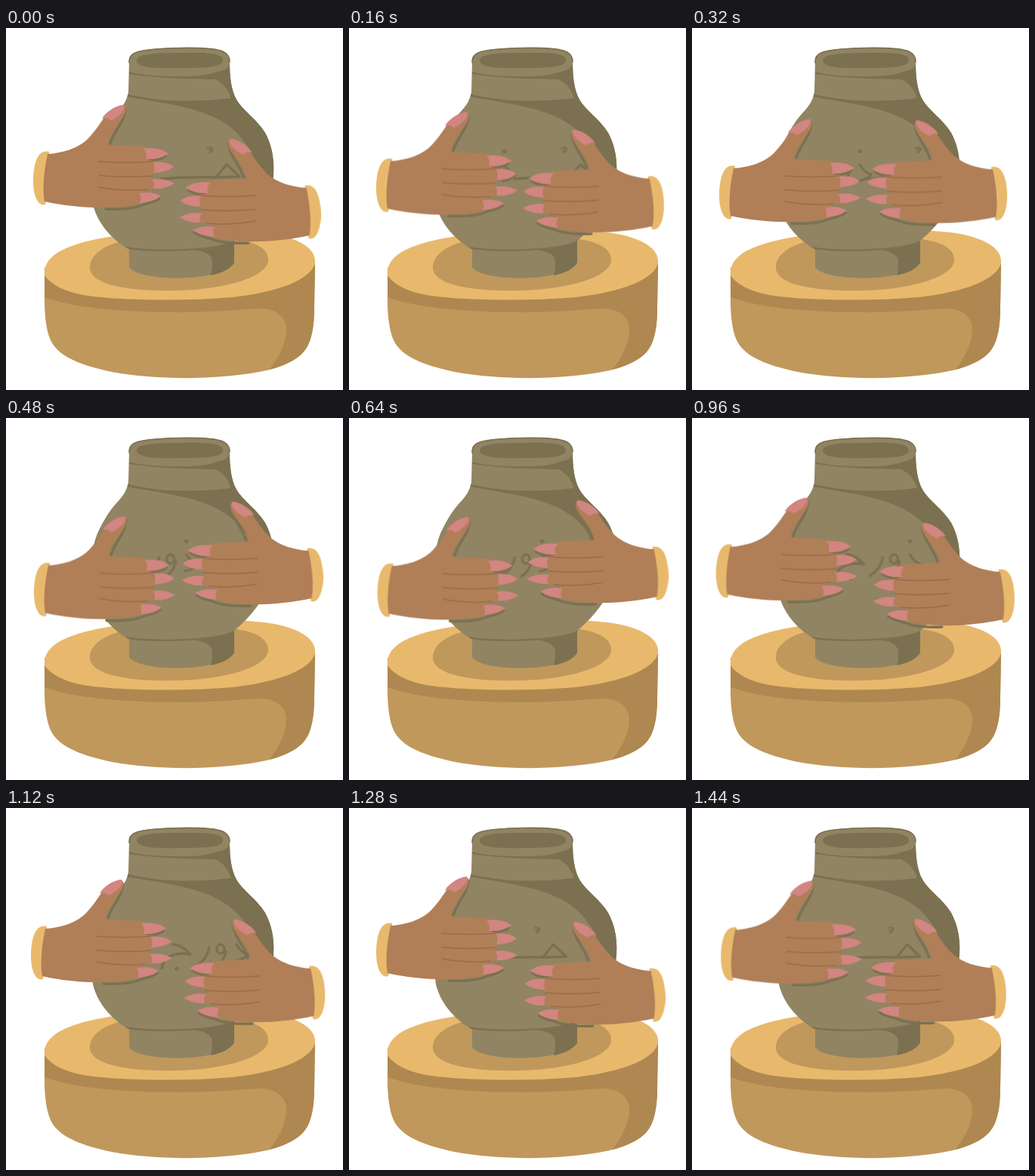
Animation of 446x480 px, one loop 1.52 s. Source, as an HTML page without scripts:

```html
<!DOCTYPE html>
<html lang="en">
<head>
<meta charset="utf-8">
<title>Pottery wheel</title>
<style>
  :root {
    --clay: #918462; --clay-dark: #7b7150;
    --wood: #c0985c; --wood-dark: #ae8850; --wood-light: #e8b96c;
    --skin: #b07f58; --crease: #9b6b4a; --nail: #d28581;
  }
  html, body { margin: 0; height: 100%; overflow: hidden; background: #fff; }
  svg { display: block; width: 100vw; height: 100vh; }
  .clay { fill: var(--clay); }
  .clay-dark { fill: var(--clay-dark); }
  .wood { fill: var(--wood); }
  .wood-dark { fill: var(--wood-dark); }
  .wood-light { fill: var(--wood-light); }
  .skin { fill: var(--skin); }
  .nail { fill: var(--nail); }
  .groove, .crease { fill: none; stroke: var(--clay-dark); stroke-width: 3.4; stroke-linecap: round; stroke-linejoin: round; }
  .crease { stroke: var(--crease); stroke-width: 1.6; }
  .fine { stroke-width: 1.6; }
  .dots { stroke-width: 5.5; }

  /* One loop is 19 ticks of 80 ms */
  .left, .right { animation: left 1.52s steps(2) infinite; }
  .right { animation-name: right; }
  .word { --from: -116.2px; --to: 41.5px; animation: drift 1.52s steps(19) infinite, word 1.52s step-end infinite; }
  .last-letter { animation: last-letter 1.52s step-end infinite; }
  .peak { --from: -64.8px; --to: 72px; animation: drift 1.52s steps(19) -.72s infinite, peak 1.52s step-end infinite; }

  @keyframes drift {
    from { transform: translateX(var(--from)); }
    to { transform: translateX(var(--to)); }
  }
  @keyframes word { 0%, 84.21% { opacity: 0; } 10.52% { opacity: 1; } }
  @keyframes last-letter { 0% { opacity: 0; } 57.89% { opacity: 1; } }
  @keyframes peak { 0%, 84.21% { opacity: 1; } 31.57% { opacity: 0; } }
  @keyframes left {
    0% { transform: translate(0, 0); animation-timing-function: steps(4); }
    21.05% { transform: translate(0, 19px); }
    31.57% { transform: translate(1px, 28.5px); animation-timing-function: steps(1); }
    36.84% { transform: translate(2px, 32px); animation-timing-function: steps(1); }
    42.1% { transform: translate(1.6px, 29.3px); }
    52.63% { transform: translate(-2.5px, 16px); }
    63.15% { transform: translate(-4.3px, 3.8px); }
    73.68% { transform: translate(-3px, -7px); }
    84.21% { transform: translate(0, -11px); }
    94.73% { transform: translate(2.2px, -5.4px); animation-timing-function: steps(1); }
    100% { transform: translate(0, 0); }
  }
  @keyframes right {
    0% { transform: translate(0, 0); animation-timing-function: steps(4); }
    21.05% { transform: translate(.6px, -24.5px); }
    31.57% { transform: translate(3px, -36px); animation-timing-function: steps(1); }
    36.84% { transform: translate(5px, -41px); animation-timing-function: steps(1); }
    42.1% { transform: translate(6px, -38px); }
    52.63% { transform: translate(7px, -23px); }
    63.15% { transform: translate(10.3px, -8px); }
    73.68% { transform: translate(5.7px, .8px); }
    84.21% { transform: translate(2px, 4px); }
    94.73% { transform: translate(-.8px, 0); animation-timing-function: steps(1); }
    100% { transform: translate(0, 0); }
  }
</style>
</head>
<body>
<svg viewBox="0 0 446 480">
  <defs>
    <path id="body" d="M163 44C163 32 172 28 230 26C286 25 296 31 296 45C296 65 298 82 305 95C314 110 332 121 343 139C355 161 357 188 351 215C342 240 325 263 302 282C270 298 195 298 162 293C138 279 121 258 115 234C111 205 112 175 121 153C128 138 136 124 146 113C155 104 161 94 162 84Z"/>
    <clipPath id="vase"><use href="#body"/></clipPath>
    <path id="wheel" d="M51 318V368C52 395 56 412 64 422C78 440 108 449 140 456C200 467 280 467 340 455C372 448 392 437 400 420C406 407 408 390 408 370L409 312Z"/>
    <clipPath id="rim"><use href="#wheel"/></clipPath>

    <g id="hand">
      <path class="groove" d="M158 108C157 124 142 138 138 153M132 240C155 241 172 239 182 234Q196 231 203 226M188 175Q204 176 211 170"/>
      <path class="wood-light" d="M57 164C41 160 36 182 36 203C36 224 43 237 52 234C56 215 57 185 57 164Z"/>
      <path class="skin" d="M55 167C74 166 93 160 105 150C116 140 124 127 129 120L135 113L153 103C160 102 160 109 156 116C149 128 138 137 134 155L184 157Q192 165 186 174L197 177Q205 184 198 192L191 197Q201 206 194 213L178 217Q186 225 179 232C150 241 95 240 51 230C48 215 50 190 55 167Z"/>
      <g class="nail">
        <path d="M182 160Q202 157 215 166.500Q203 175 185 174Q188 166 182 160Z"/>
        <path d="M195 178Q212 176 222 184Q212 192 195 192Q198 185 195 178Z"/>
        <path d="M193 201Q209 198 223 206Q211 214 195 213Q198 206 193 201Z"/>
        <path d="M176 219Q193 216 205 223Q195 231 177 232Q180 225 176 219Z"/>
        <path d="M127 120C133 110 147 102 156 102C160 107 151 117 139 123Q134 118 127 120Z"/>
      </g>
      <path class="crease" d="M123 177Q160 180 194 177M123 195.500Q160 199 194 196M123 211Q155 217 187 214"/>
    </g>
  </defs>

  <use href="#wheel" class="wood"/>
  <g clip-path="url(#rim)">
    <path class="wood-dark" d="M48 310V356C92 373 165 377 230 377C275 377 310 373 338 372C362 373 372 387 371 402C370 420 360 439 346 456H420V300Z"/>
  </g>
  <path class="wood-light" d="M51 328C49 299 84 283 163 273C225 265 310 266 355 273C395 281 411 296 409 312C403 334 360 350 300 357C230 363 145 361 102 354C77 349 60 341 51 328Z"/>
  <path class="wood" d="M111 319C110 300 132 285 165 281C220 273 290 275 320 283C340 289 348 298 347 309C344 331 290 346 230 348C160 350 113 340 111 319Z"/>

  <path class="clay" d="M163 288V317C174 336 282 339 302 311V280Z"/>
  <path class="clay-dark" d="M246 294C266 296 273 302 273 311Q273 320 271 328C286 325 298 319 302 311V280Z"/>
  <use href="#body" class="clay"/>
  <g clip-path="url(#vase)">
    <path class="clay-dark" d="M154 90C230 104 292 107 322 161C332 185 341 208 345 232L370 220V90L297 93C245 99 200 98 154 86Z"/>
    <path class="clay-dark" d="M163 61C205 67 250 68 277 68C288 73 296 84 298 95H312V40H296C290 62 260 65 220 64C195 64 172 61 163 58Z"/>
    <path class="groove" d="M159 292C200 298 270 296 304 284"/>
  </g>
  <path class="clay" d="M163 44C163 32 172 28 230 26C286 25 296 31 296 45C296 58 280 60 230 61C180 61 163 57 163 44Z"/>
  <path class="groove fine" d="M163 46C163 32 172 28 230 26.500C286 25.500 296 31 296 45"/>
  <path class="clay-dark" d="M173 43C173 34 198 33 230 33C270 32 287 34 287 43C287 52 265 53 230 53C195 54 173 52 173 43Z"/>

  <g clip-path="url(#vase)">
    <g class="word groove">
      <path d="M305 181Q311 192 320 194Q316 201 303 203M269 185Q266 201 252 209M291 190Q289 203 278 210"/>
      <ellipse cx="284" cy="187" rx="5" ry="6"/>
      <path class="dots" d="M305 163.500h.1"/>
      <g class="last-letter">
        <path d="M221 181Q232 181 244 194Q229 191 216 197Q208 202 206 213"/>
        <path class="dots" d="M226 213h.1"/>
      </g>
    </g>
    <g class="peak groove">
      <path d="M205 200Q240 197 278 198L292 181L309 197L279 198"/>
      <path class="fine" d="M266 160q5-4 8 0q-1 5-5 3q0-4 4-2q1 3-4 5"/>
    </g>
  </g>

  <g class="left"><use href="#hand"/></g>
  <g class="right"><use href="#hand" transform="translate(452.500 45) scale(-1 1)"/></g>
</svg>
</body>
</html>
```
